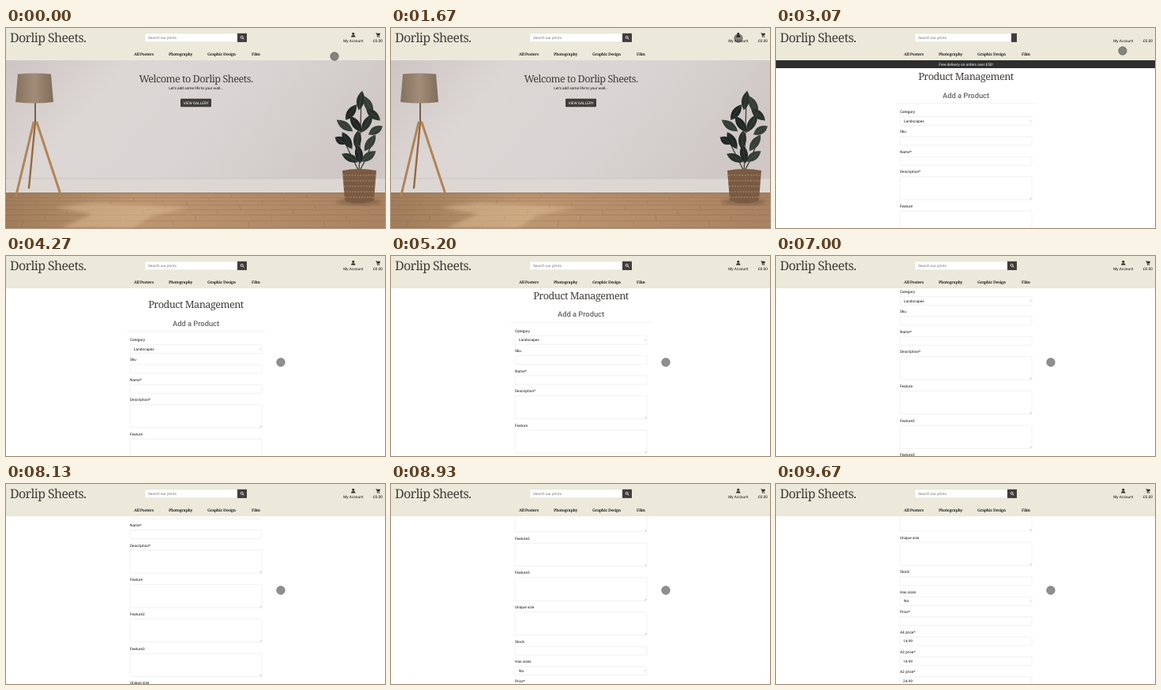
An HTML page that plays this animation: 480x254 px, repeating every 9.74 s.

```html
<!DOCTYPE html>
<html lang="en">
<head>
<meta charset="utf-8">
<title>Dorlip Sheets</title>
<style>
  html, body { margin: 0; width: 100%; height: 100%; overflow: hidden; background: #fff; }
  svg { display: block; width: 100%; height: 100%; }
  text { font: 4.75px Roboto, sans-serif; fill: #111; text-rendering: geometricPrecision; }
  .serif { font-family: "Noto Serif", serif; letter-spacing: -.04em; fill: #413d3a; }
  .brand { font-size: 16px; }
  .title { font-size: 12.65px; }
  .nav { font-size: 5px; font-weight: 600; fill: #222; }
  .subtitle { font-size: 9.3px; font-weight: 500; fill: #666; }
  .mid { text-anchor: middle; }
  .light { fill: #fff; }
  .muted { fill: #777; }
  .field { fill: #fff; stroke: #dcdcdc; stroke-width: .4; }
  .mark { fill: none; stroke: #777; stroke-width: .4; }
  .dark { fill: #403c3a; }
</style>
</head>
<body>
<svg viewBox="0 0 480 254">
  <defs>
    <linearGradient id="wall" x2="1" y2=".3">
      <stop offset="0" stop-color="#cdc5c3"/>
      <stop offset=".3" stop-color="#dcd6d5"/>
      <stop offset=".65" stop-color="#d9d4d3"/>
      <stop offset="1" stop-color="#cfc8c6"/>
    </linearGradient>
    <linearGradient id="shade" x2="1">
      <stop offset="0" stop-color="#85735f"/>
      <stop offset=".5" stop-color="#a18c77"/>
      <stop offset="1" stop-color="#7f6d5b"/>
    </linearGradient>
    <linearGradient id="wood" x2="1">
      <stop offset="0" stop-color="#a17c5a"/>
      <stop offset=".35" stop-color="#bd9771"/>
      <stop offset="1" stop-color="#a98361"/>
    </linearGradient>
    <filter id="soft"><feGaussianBlur stdDeviation="2"/></filter>
  </defs>

  <g id="home">
    <rect y="41" width="480" height="170" fill="url(#wall)"/>
    <path d="M0 191H480V210H0Z" fill="#ddd7d4"/>
    <path d="M0 191H480" stroke="#c5bdb9" stroke-width=".7"/>
    <path d="M0 209H480V254H0Z" fill="url(#wood)"/>
    <g id="planks" stroke="#805d40" stroke-width=".5" opacity=".55"></g>
    <path d="M62 228L112 222L232 228L186 238L160 254H70L110 236Z" fill="#dfbd96" opacity=".5" filter="url(#soft)"/>
    <path d="M0 209.5H480" stroke="#8d6b50" stroke-width=".8"/>
    <g fill="none" stroke="#b18456" stroke-width="3" stroke-linecap="round">
      <path d="M37 95V122" stroke="#75604c" stroke-width="2"/>
      <path d="M37 120L29 203" stroke="#95683f" stroke-width="2.4"/>
      <path d="M35 120L13 212M39 120L68 208"/>
    </g>
    <path d="M15 58.500Q36 56.500 57 58.500L60 94Q36 97 12 94Z" fill="url(#shade)"/>
    <ellipse cx="447" cy="221" rx="28" ry="4" fill="#60452f" opacity=".45" filter="url(#soft)"/>
    <path d="M447 184Q449 140 450 84M447 182Q436 160 428 143M447 183Q460 160 466 136" fill="none" stroke="#433c31" stroke-width="1.3"/>
    <g id="leaves"></g>
    <path d="M426 181Q447 177 469 181L466 219Q447 226 429 219Z" fill="#795a42"/>
    <path d="M427 187H468M427 194H468M428 201H467M428 208H467M429 215H466" stroke="#a07d5e" stroke-width="1.3" stroke-dasharray="2 1.5"/>
    <text class="serif title mid" x="240.500" y="69">Welcome to Dorlip Sheets.</text>
    <text class="mid" x="240.500" y="78.300">Let's add some life to your wall...</text>
    <rect class="dark" x="221" y="89.700" width="39" height="10.500" rx="1"/>
    <text class="light mid" x="240.500" y="96.700">VIEW GALLERY</text>
  </g>

  <g id="admin">
    <rect width="480" height="254" fill="#fff"/>
    <g id="form">
      <text class="serif title mid" x="240.500" y="66">Product Management</text>
      <text class="subtitle mid" x="240.500" y="88.600">Add a Product</text>
      <path d="M152 95.700H331" stroke="#e6e6e6" stroke-width=".5"/>
    </g>
  </g>

  <rect width="480" height="41" fill="#ece9da"/>
  <text class="serif brand" x="5" y="18">Dorlip Sheets.</text>
  <rect class="field" x="176" y="7" width="129" height="10.700"/>
  <text class="muted" x="180" y="14.200">Search our prints</text>
  <rect id="searchButton" class="dark" y="6.800" height="11.100"/>
  <g id="icons" fill="#2d2a28">
    <circle cx="298.700" cy="11.800" r="1.500" fill="none" stroke="#fff" stroke-width=".8"/>
    <path d="M299.800 12.900L301.300 14.400" stroke="#fff" stroke-width=".9"/>
    <circle cx="439.800" cy="7.300" r="1.500"/>
    <path d="M437.200 11.500V10.800Q437.200 9.200 438.800 9.200H440.800Q442.400 9.200 442.400 10.800V11.500Z"/>
    <path d="M468.200 6H469.500L469.800 6.800H474L473.200 9.600H470.300L470.500 10.200H473V10.700H470L469.100 6.600H468.200Z"/>
    <circle cx="470.600" cy="11.200" r=".6"/><circle cx="472.700" cy="11.200" r=".6"/>
  </g>
  <text class="mid" x="439.800" y="17.700">My Account</text>
  <text class="mid" x="471" y="17.700">£0.00</text>
  <text class="serif nav" x="162" y="35.300">All Posters</text>
  <text class="serif nav" x="206" y="35.300">Photography</text>
  <text class="serif nav" x="255" y="35.300">Graphic Design</text>
  <text class="serif nav" x="311" y="35.300">Film</text>
  <g id="banner">
    <rect y="41" width="480" height="10" fill="#2e2e2e"/>
    <text class="light mid" x="240.500" y="47.900">Free delivery on orders over £50!</text>
  </g>
  <circle id="cursor" r="5.400" fill="#000" fill-opacity=".44" stroke="#000" stroke-opacity=".3" stroke-width=".7"/>
</svg>

<script>
const LOOP = 9740, STEP = 1000 / 15;
const PAGE_AT = 3070, LOADED_AT = 3200;
const $ = id => document.getElementById(id);

function add(parent, tag, attrs, text = '') {
  const node = document.createElementNS('http://www.w3.org/2000/svg', tag);
  for (const key in attrs) node.setAttribute(key, attrs[key]);
  node.textContent = text;
  parent.append(node);
}

function buildForm() {
  const fields = [
    ['Category', 'select', 'Landscapes'], ['Sku'], ['Name*'],
    ['Description*', 'area'], ['Feature', 'area'], ['Feature2', 'area'],
    ['Feature3', 'area'], ['Unique size', 'area'], ['Stock'],
    ['Has sizes', 'select', 'No'], ['Price*'],
    ['A4 price*', 'input', '14.99'], ['A3 price*', 'input', '19.99'], ['A2 price*', 'input', '24.99']
  ];
  const form = $('form');
  let y = 106.2;
  for (const [label, kind = 'input', value] of fields) {
    const top = y + 6.3, height = kind === 'area' ? 29.3 : 11;
    add(form, 'text', { x: 157, y: y + 1.8 }, label);
    add(form, 'rect', { class: 'field', x: 157, y: top, width: 167, height, rx: .8 });
    if (value) add(form, 'text', { x: kind === 'select' ? 162 : 161, y: top + 7.2 }, value);
    if (kind === 'select') add(form, 'path', { class: 'mark', d: `M321 ${top + 5}l1 1l1 -1` });
    if (kind === 'area') add(form, 'path', { class: 'mark', d: `M321.500 ${top + 28.8}l2 -2m-.8 2l.8 -.8` });
    y += kind === 'area' ? 43.7 : 25.4;
  }
}

function buildRoom() {
  for (let row = 0, y = 212; y < 254; row++) {
    const next = y + 3.5 + row * .8;
    add($('planks'), 'path', { d: `M0 ${y}H480` });
    for (let x = (row * 67) % 95; x < 480; x += 95)
      add($('planks'), 'path', { d: `M${x} ${y}L${x + (x - 240) * .012} ${next}` });
    y = next;
  }
  // x, y, length, angle
  const leaves = [
    [449, 92, 25, 100], [459, 98, 26, 65], [437, 107, 24, 125], [465, 110, 23, 40],
    [429, 124, 25, 35], [443, 122, 25, 55], [457, 121, 27, 120], [468, 130, 21, 150],
    [432, 143, 25, 60], [445, 142, 24, 95], [461, 146, 25, 125], [424, 143, 17, 30],
    [436, 165, 24, 25], [459, 163, 23, 145], [447, 160, 24, 80]
  ];
  leaves.forEach(([x, y, length, angle], i) => {
    const transform = `translate(${x} ${y}) rotate(${angle})`, half = length / 2;
    add($('leaves'), 'path', {
      transform, fill: ['#29302c', '#363e38', '#202724'][i % 3],
      d: `M${-half} 0Q0 -10 ${half} 0Q0 10 ${-half} 0`
    });
    add($('leaves'), 'path', { transform, d: `M${-half} 0H${half}`, stroke: '#5b6258', 'stroke-width': .4 });
  });
}

const linear = u => u;
const smooth = u => u * u * (3 - 2 * u);

// Keys are [time, ...values].
function track(keys, t, ease) {
  if (t <= keys[0][0]) return keys[0].slice(1);
  for (let i = 1; i < keys.length; i++) {
    const [a, b] = [keys[i - 1], keys[i]];
    if (t <= b[0]) {
      const u = ease((t - a[0]) / (b[0] - a[0]));
      return a.slice(1).map((v, k) => v + (b[k + 1] - v) * u);
    }
  }
  return keys[keys.length - 1].slice(1);
}

const cursorKeys = [
  [0, 416, 36], [670, 440, 13], [2200, 440, 13], [2730, 439, 29],
  [3540, 439, 29], [4030, 334, 120], [4270, 348, 135]
];
const scrollKeys = [
  [4810, 0], [5730, 26.5], [7000, 61], [7530, 75], [7870, 75], [8130, 104], [9670, 289.5]
];

const show = (id, on) => { $(id).style.display = on ? '' : 'none'; };

function draw(now) {
  const t = Math.floor((now % LOOP + 5) / STEP) * STEP + 2;
  const onAdmin = t >= PAGE_AT - 5;
  const loading = onAdmin && t < LOADED_AT;
  show('home', !onAdmin);
  show('admin', onAdmin);
  show('banner', loading);
  show('icons', !loading);
  $('searchButton').setAttribute('x', loading ? 298 : 293);
  $('searchButton').setAttribute('width', loading ? 7 : 12);
  const [scroll] = track(scrollKeys, t, linear);
  $('form').setAttribute('transform', `translate(0 ${-scroll})`);
  const [x, y] = track(cursorKeys, t, smooth);
  $('cursor').setAttribute('transform', `translate(${x} ${y})`);
}

buildForm();
buildRoom();
const start = performance.now();
function tick() {
  draw(performance.now() - start);
  requestAnimationFrame(tick);
}
tick();
</script>
</body>
</html>
```
